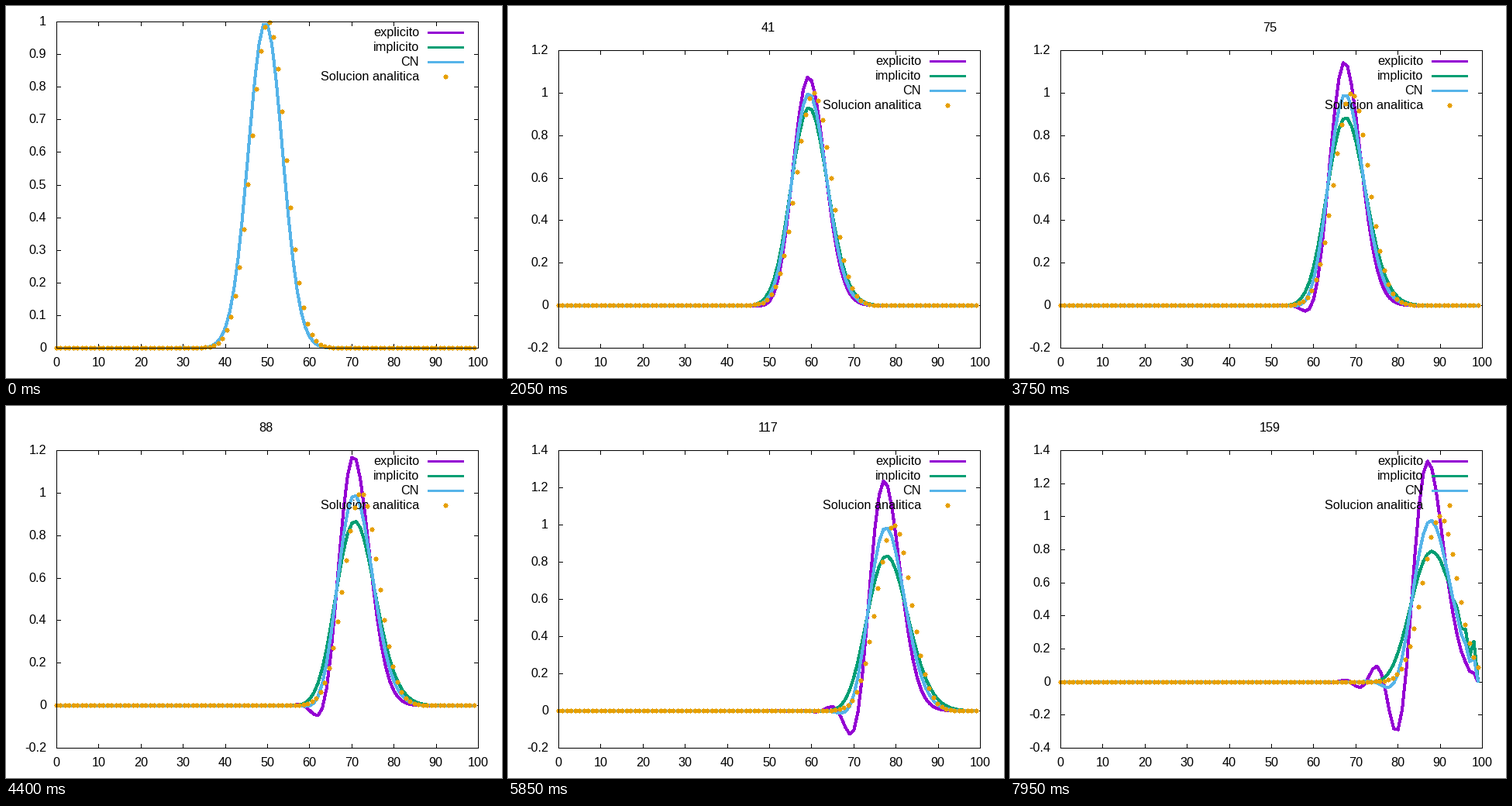
Write a matplotlib script that moves like this. It is 640 px wide and 480 px high and loops after 8 s.

```python
import math

import matplotlib.pyplot as plt
import numpy as np
from matplotlib.animation import FuncAnimation
from matplotlib.collections import PolyCollection

plt.rcParams.update({
    "font.family": "Liberation Sans",
    "path.simplify": False,
})

W, H, DPI = 640, 480, 100
FRAMES, INTERVAL = 160, 50
LEFT, RIGHT, BOTTOM = 65, 609, 441
PURPLE, GREEN, BLUE, ORANGE = "#9400d3", "#009e73", "#56b4e9", "#e69f00"
NAMES = ["explicito", "implicito", "CN", "Solucion analitica"]
PT = 72 / DPI  # points per pixel

# Advection of a Gaussian pulse on a fixed grid
N = 100
DX = 100 / (N - 1)
SHIFT = 0.25
COURANT = SHIFT / DX
grid = np.arange(N) * DX


def pulse(x, centre):
    return np.exp(-0.03 * (x - centre) ** 2)


def solve():
    eye = np.eye(N)
    diff = (np.eye(N, k=1) - np.eye(N, k=-1)) * COURANT / 2
    diff[0] = diff[-1] = 0
    steps = [
        eye - diff,
        np.linalg.inv(eye + diff),
        np.linalg.solve(eye + diff / 2, eye - diff / 2),
    ]
    runs = []
    for step in steps:
        u = pulse(grid, 50)
        u[0] = u[-1] = 0
        run = [u]
        for _ in range(FRAMES - 1):
            u = step @ u
            u[0] = u[-1] = 0
            run.append(u)
        runs.append(run)
    return runs


runs = solve()
dots_x = grid[:-1]


def y_scale(low, high):
    """Tick step and limits rounded outward to whole steps."""
    span = high - low
    power = 10.0 ** math.floor(math.log10(span))
    room = 20 / (span / power)
    step = power * (0.2 if room > 10 else 0.5 if room > 4 else 1)
    return step, math.floor(low / step), math.ceil(high / step)


def px(x):
    return LEFT + np.asarray(x) * (RIGHT - LEFT) / 100 + 0.5


def pixel(v):
    """Centre of the pixel that holds v."""
    return np.floor(v) + 0.5


fig = plt.figure(figsize=(W / DPI, H / DPI), dpi=DPI, facecolor="white")
ax = fig.add_axes([0, 0, 1, 1])
ax.set_xlim(0, W)
ax.set_ylim(H, 0)
ax.axis("off")


def label(x, y, s, ha, z=1):
    return ax.text(x, y, s, ha=ha, va="baseline", fontsize=16.3 * PT,
                   color="black", zorder=z)


def line(color, width, z):
    return ax.plot([], [], color=color, lw=width * PT, antialiased=False,
                   snap=False, solid_joinstyle="round",
                   solid_capstyle="butt", zorder=z)[0]


def blob():
    """Small square with a one-pixel nub on each side."""
    corner = np.array([(0.5, 3.5), (0.5, 2.5), (2.5, 2.5), (2.5, 0.5), (3.5, 0.5)])
    return np.vstack([
        corner,
        corner[::-1] * (1, -1),
        corner * (-1, -1),
        corner[::-1] * (-1, 1),
    ])


BLOB = blob()

for k in range(0, 101, 10):
    label(px(k) - 0.5, 465, str(k), "center")

title = label(335.5, 33, "", "center")
border = line("black", 1, 20)
ticks = line("black", 1, 1)
y_labels = [label(52, 0, "", "right") for _ in range(14)]
key_text = [label(533, 0, s, "right", 2 + 2 * i) for i, s in enumerate(NAMES)]
key_line = [line(c, 3, 3 + 2 * i) for i, c in enumerate([PURPLE, GREEN, BLUE])]
curves = [line(c, 3, 3 + 2 * i) for i, c in enumerate([PURPLE, GREEN, BLUE])]
dots = PolyCollection([], facecolors=ORANGE, edgecolors="none",
                      antialiaseds=False, snap=False, zorder=9)
ax.add_collection(dots, autolim=False)


def segments(pairs):
    xs, ys = [], []
    for x0, y0, x1, y1 in pairs:
        xs += [x0, x1, np.nan]
        ys += [y0, y1, np.nan]
    return xs, ys


def draw(n):
    top = 57 if n else 20
    exact = pulse(dots_x, 50 + SHIFT * (n + 1))
    data = [run[n] for run in runs]
    step, first, last = y_scale(min(d.min() for d in data),
                                max(exact.max(), max(d.max() for d in data)))

    def py(v):
        return BOTTOM - (v / step - first) * (BOTTOM - top) / (last - first) + 0.5

    title.set_text(str(n) if n else "")
    l, r, b, t = LEFT + 0.5, RIGHT + 0.5, BOTTOM + 0.5, top + 0.5
    border.set_data([l - 0.5, r, r, l, l], [b, b, t, t, b])

    marks = []
    for k in range(0, 101, 10):
        x = pixel(px(k))
        marks += [(x, b, x, b - 5), (x, t, x, t + 5)]
    for text in y_labels:
        text.set_text("")
    for k, text in zip(range(first, last + 1), y_labels):
        y = pixel(py(k * step))
        marks += [(l, y, l + 5, y), (r, y, r - 5, y)]
        text.set_text(f"{k * step:.6g}")
        text.set_y(y + 4.7)
    ticks.set_data(*segments(marks))

    for i, text in enumerate(key_text):
        text.set_y(top + 19 + 19 * i)
    for i, sample in enumerate(key_line):
        y = top + 14.5 + 19 * i
        sample.set_data([544, 591], [y, y])

    for curve, d in zip(curves, data):
        curve.set_data(px(np.arange(N)), py(d))
    xs = np.append(pixel(px(dots_x)), 567.5)
    ys = np.append(pixel(py(exact)), top + 71.5)
    dots.set_verts([BLOB + c for c in zip(xs, ys)])
    return []


anim = FuncAnimation(fig, draw, frames=FRAMES, interval=INTERVAL,
                     init_func=lambda: [], repeat=True, repeat_delay=0)
plt.show()
```
